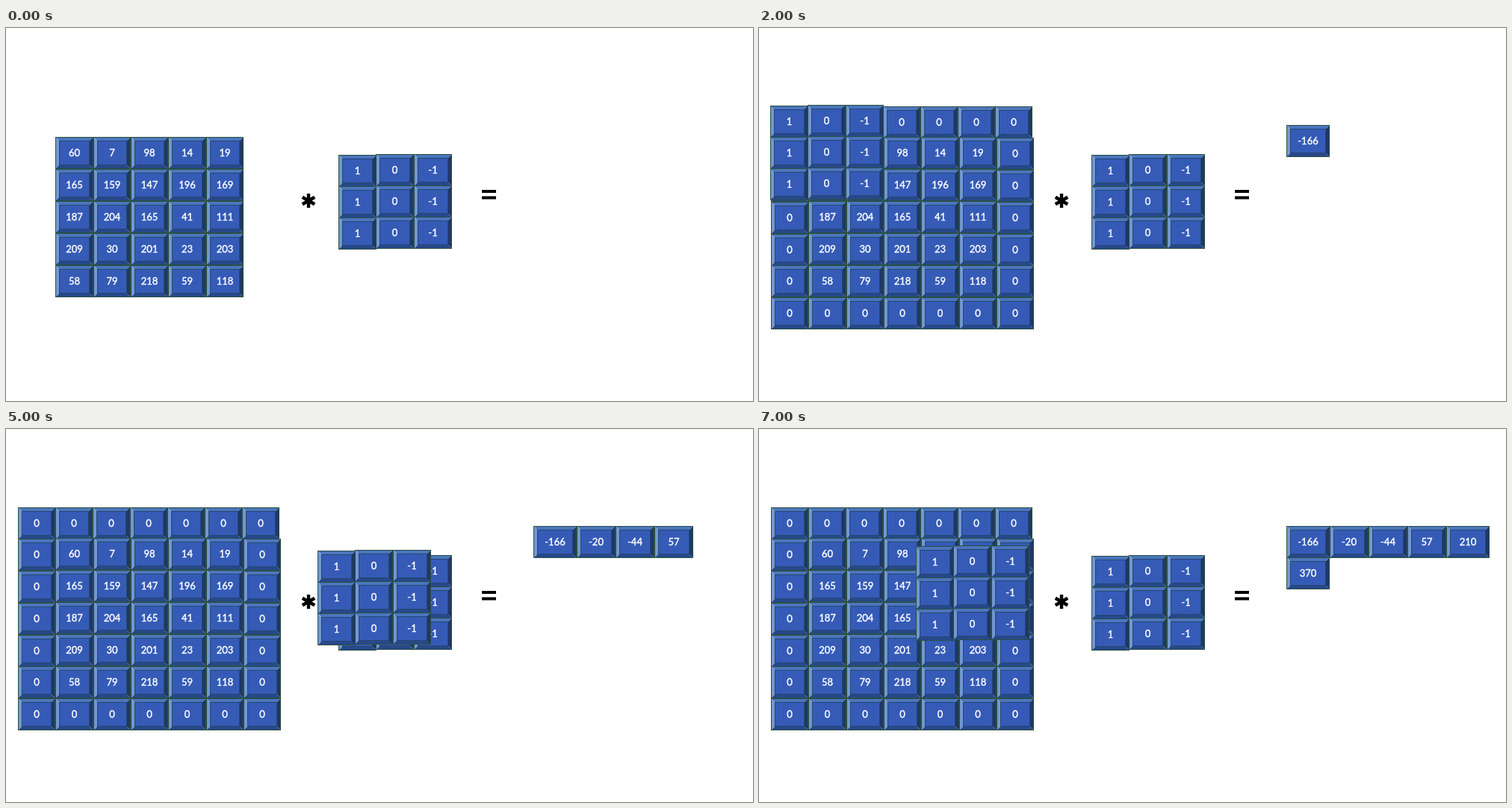
An HTML page with a canvas for the animation above (8 s loop, 1000x500 px).

```html
<!DOCTYPE html>
<html lang="en">
<head>
<meta charset="utf-8">
<title>Padded convolution</title>
<style>
html, body { margin: 0; width: 100%; height: 100%; overflow: hidden; background: #fff; }
canvas { display: block; width: 1000px; height: 500px; }
</style>
</head>
<body>
<canvas id="stage" width="1000" height="500"></canvas>
<script>
const ctx = document.getElementById('stage').getContext('2d');
const STEP = 1000, STEPS = 8;
const TILE_H = 43, BEVEL = 5.5;

const IMAGE = [
  [60, 7, 98, 14, 19],
  [165, 159, 147, 196, 169],
  [187, 204, 165, 41, 111],
  [209, 30, 201, 23, 203],
  [58, 79, 218, 59, 118]
];
const RESULTS = [-166, -20, -44, 57, 210, 370];
const HOME = { x: 445, y: 170 };
// Where the sliding kernel stands, from the third step on
const STOPS = [[15, 104], [341, 168], [116, 104], [417, 163], [303, 163], [210, 157]];

function poly(color, ...p) {
  ctx.fillStyle = color;
  ctx.beginPath();
  for (let i = 0; i < p.length; i += 2) ctx.lineTo(p[i], p[i + 1]);
  ctx.fill();
}

function tile(x, y, w, label) {
  const r = x + w, d = y + TILE_H;
  const l2 = x + BEVEL, t2 = y + BEVEL, r2 = r - BEVEL, d2 = d - BEVEL;
  poly('#4c76bd', x, y, r, y, r2, t2, l2, t2);
  poly('#7398cf', x, y, l2, t2, l2, d2, x, d);
  poly('#1f3864', r, y, r, d, r2, d2, r2, t2);
  poly('#27488a', x, d, l2, d2, r2, d2, r, d);
  poly('#355bb7', l2, t2, r2, t2, r2, d2, l2, d2);
  ctx.lineWidth = 1;
  ctx.strokeStyle = '#264672';
  ctx.strokeRect(l2, t2, r2 - l2, d2 - t2);
  ctx.strokeStyle = '#2a5143';
  ctx.strokeRect(x + 0.5, y + 0.5, w - 1, TILE_H - 1);
  ctx.fillStyle = ctx.strokeStyle = '#fff';
  ctx.lineWidth = 0.4;
  ctx.fillText(label, x + w / 2, y + 26);
  ctx.strokeText(label, x + w / 2, y + 26);
}

// One tile in a column of an evenly spaced row
function cell(col, y, label, pitch = 50.3) {
  const x = Math.round(16 + pitch * col);
  tile(x, Math.round(y), Math.round(16 + pitch * (col + 1)) - x, label);
}

function padding() {
  for (let r = 0; r < 7; r++) {
    const y = 104.7 + 42.7 * r, edge = r % 6 === 0;
    for (let c = 0; c < 7; c += edge ? 1 : 6) cell(c, y, 0, r ? 50.3 : 50);
  }
}

// Unopened slats hide the lower part of each band
function blinds() {
  for (let k = 0; k < 6; k++) {
    const y = 138 + 50 * k, g = ctx.createLinearGradient(0, y, 0, y + 9);
    g.addColorStop(0, 'rgba(255,255,255,0)');
    g.addColorStop(1, '#fff');
    ctx.fillStyle = g;
    ctx.fillRect(10, y, 362, 17);
  }
}

function image() {
  IMAGE.forEach((line, r) => line.forEach((v, c) => cell(c + 1, 146 + 43 * r, v)));
}

function kernel(x, y) {
  for (let r = 0; r < 3; r++)
    for (let c = 0; c < 3; c++)
      tile(Math.round(x + 50.4 * c), y + 42 * r - (c > 0), 51, 1 - c);
}

function signs() {
  ctx.strokeStyle = ctx.fillStyle = '#000';
  ctx.lineWidth = 4.4;
  ctx.beginPath();
  for (let i = 0; i < 3; i++) {
    const a = Math.PI * (0.5 + i / 3), dx = 9.5 * Math.cos(a), dy = 9.5 * Math.sin(a);
    ctx.moveTo(405 - dx, 231.5 - dy);
    ctx.lineTo(405 + dx, 231.5 + dy);
  }
  ctx.stroke();
  for (const y of [217, 225.5]) ctx.fillRect(637, y, 19, 4);
}

// Five results to a line, wider tiles for three digits
function results(count) {
  let x;
  RESULTS.slice(0, count).forEach((v, i) => {
    if (i % 5 === 0) x = 706;
    const w = Math.abs(v) > 99 ? 58 : 52;
    tile(x, 130 + 42 * Math.floor(i / 5), w, v);
    x += w;
  });
}

function draw(step) {
  ctx.fillStyle = '#fff';
  ctx.fillRect(0, 0, 1000, 500);
  ctx.font = '13px Lato, "Open Sans", sans-serif';
  ctx.textAlign = 'center';
  if (step > 0) padding();
  if (step === 1) blinds();
  image();
  kernel(HOME.x, HOME.y);
  if (step > 1) kernel(...STOPS[step - 2]);
  signs();
  results(Math.max(0, step - 1));
}

function frame(now) {
  draw(Math.floor(now / STEP) % STEPS);
  requestAnimationFrame(frame);
}
requestAnimationFrame(frame);
</script>
</body>
</html>
```
